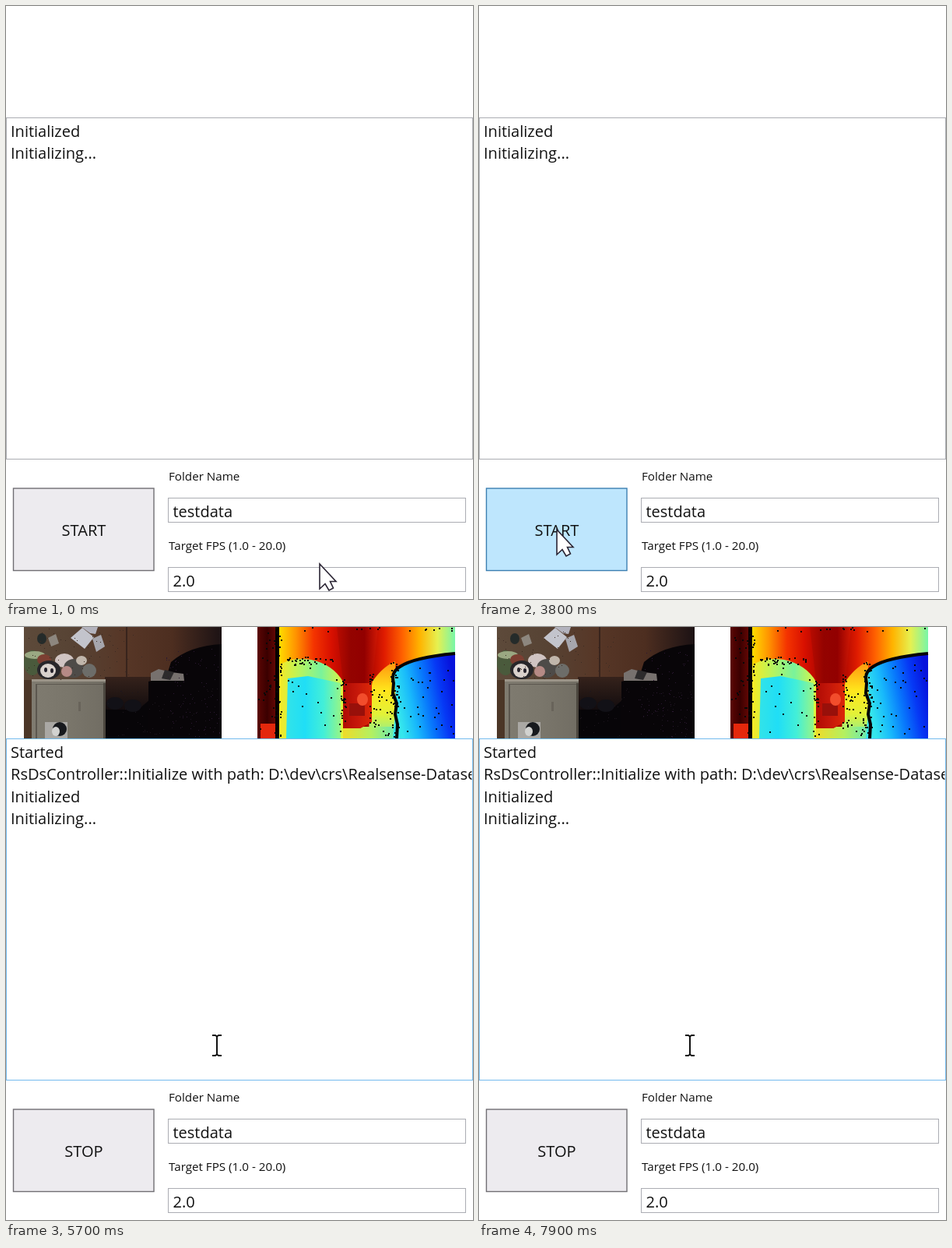
An HTML page with a canvas for the animation above (8 s loop, 600 by 761 pixels).

```html
<!DOCTYPE html>
<html lang="en">
<head>
<meta charset="utf-8">
<style>
html, body { margin: 0; width: 600px; height: 761px; overflow: hidden; background: #fff; }
canvas, svg.ui { position: absolute; left: 0; top: 0; }
text { font: 20.05px "Open Sans", "Noto Sans", sans-serif; fill: #111; white-space: pre; }
.small { font-size: 15.2px; }
.box { fill: #fff; stroke: #abadb3; }
#log { fill: none; }
#log.hover { stroke: #74bbee; }
#button { fill: #edebef; stroke: #706e73; stroke-width: 1.4; }
#button.hover { fill: #bee6fd; stroke: #3c7fb1; }
</style>
</head>
<body>
<canvas id="view" width="600" height="143"></canvas>
<svg class="ui" width="600" height="761">
  <rect x="0" y="143" width="600" height="618" fill="#fff"/>
  <svg width="598.5" height="761">
    <g id="added">
      <text x="6" y="167.5">Started</text>
      <text x="6" y="196">RsDsController::Initialize with path: D:\dev\crs\Realsense-Dataset</text>
    </g>
    <g id="first">
      <text x="6" y="167.5">Initialized</text>
      <text x="6" y="196">Initializing...</text>
    </g>
  </svg>
  <rect id="log" class="box" x=".5" y="143.5" width="599" height="438"/>
  <rect id="button" x="9.5" y="619" width="180.5" height="105.5"/>
  <text id="label" x="100" y="680" text-anchor="middle"></text>
  <text class="small" x="209" y="609">Folder Name</text>
  <rect class="box" x="208.5" y="631.5" width="382" height="31"/>
  <text x="214.5" y="656">testdata</text>
  <text class="small" x="209" y="698">Target FPS (1.0 - 20.0)</text>
  <rect class="box" x="208.5" y="720.5" width="382" height="31"/>
  <text x="214.5" y="745">2.0</text>
  <path id="arrow" d="M0 0V32L7 25.5L12 34L17.5 31L13.5 22.5H21Z" fill="#fff" stroke="#2a2433" stroke-width="1.6"/>
  <path id="beam" d="M-6 -13H-2L0 -11.5L2 -13H6M0 -11.5V11.5M-6 13H-2L0 11.5L2 13H6" fill="none" stroke="#111" stroke-width="2"/>
</svg>
<script>
const LOOP = 8000, STEP = 100, START = 4000, VIDEO = 4800;
const $ = id => document.getElementById(id);
const ctx = $('view').getContext('2d');

// Pointer stops: time, x, y
const stops = [
  [0, 403, 716], [300, 402, 700], [1000, 384, 530], [1200, 385, 517], [1800, 474, 496],
  [2800, 474, 496], [3500, 120, 650], [3800, 100, 672], [4000, 100, 672],
  [4400, 150, 612], [4700, 191, 560], [5300, 271, 537], [LOOP, 271, 537]
];

function pointer(t) {
  const i = stops.findIndex(s => s[0] > t);
  const [t0, x0, y0] = stops[i - 1], [t1, x1, y1] = stops[i];
  const k = (t - t0) / (t1 - t0);
  return [x0 + (x1 - x0) * k, y0 + (y1 - y0) * k];
}

function random(seed) {
  let s = seed * 7919 + 17;
  return () => (s = (s * 16807 + 11) % 2147483647) / 2147483647;
}

function blend(x0, y0, x1, y1, ...colors) {
  const g = ctx.createLinearGradient(x0, y0, x1, y1);
  colors.forEach((c, i) => g.addColorStop(i / (colors.length - 1), c));
  return g;
}

function rect(x, y, w, h, fill) {
  ctx.fillStyle = fill;
  ctx.fillRect(x, y, w, h);
}

function shape(d, fill) {
  ctx.fillStyle = fill;
  ctx.fill(new Path2D(d));
}

function blob(x, y, rx, ry, fill) {
  ctx.fillStyle = fill;
  ctx.beginPath();
  ctx.ellipse(x, y, rx, ry, 0, 0, 7);
  ctx.fill();
}

function specks(rnd, n, x, y, w, h, fill, size = 2) {
  for (let i = 0; i < n; i++)
    rect(Math.round(x + rnd() * w), Math.round(y + rnd() * h), size, size, fill);
}

function drawRoom(rnd) {
  rect(23, 0, 254, 143, blend(23, 0, 277, 0, '#5d4a3a', '#574334', '#573727', '#4d2e20', '#1c1214'));
  rect(154, 0, 2, 85, '#38241c');
  rect(127, 80, 150, 63, '#070508');
  shape('M127 64H186V92L170 106H128Z', blend(0, 64, 0, 106, '#35221b', '#120c0e'));
  shape('M183 70L206 64L212 45Q236 24 277 22V143H183Z', '#080508');
  blob(140, 98, 11, 8, '#121117');
  blob(163, 101, 11, 8, '#121117');
  shape('M186 59L196 54L212 58L228 60L229 69H186Z', '#77716e');
  shape('M204 55L216 58L211 68L200 66Z', '#2d2b2c');
  shape('M83 14L98 1L113 13L101 28Z', '#c3c4cc');
  shape('M97 0H118L115 9L108 8Z', '#b3b3bd');
  shape('M111 15L122 10L127 25L116 32Z', '#a6a6ad');
  shape('M54 14L64 9L68 21L58 25Z', '#8d877f');
  blob(46, 15, 6, 7, '#252b2a');
  // Plush toys
  blob(34, 46, 11, 16, '#4a5a3c');
  blob(37, 36, 13, 5, '#9aa882');
  blob(49, 42, 9, 7, '#7c3f32');
  blob(75, 43, 12, 9, '#d0c4c2');
  blob(55, 55, 15, 12, '#27262a');
  blob(54, 56, 10, 9, '#d9d1cc');
  blob(51, 55, 2, 3, '#24202a');
  blob(59, 56, 2, 3, '#24202a');
  blob(87, 53, 13, 12, '#4e4b48');
  blob(78, 57, 7, 7, '#b68a85');
  blob(97, 43, 7, 6, '#c0b6ab');
  blob(107, 56, 9, 9, '#6d6d69');
  // Cabinet
  rect(23, 68, 11, 75, '#4b3627');
  rect(33, 67, 95, 76, blend(33, 0, 128, 0, '#7f7b70', '#7a766b', '#716d63'));
  rect(33, 67, 95, 3, '#9b9488');
  rect(38, 73, 88, 1, '#5c574f');
  rect(38, 73, 2, 70, '#5c574f');
  rect(125, 72, 3, 71, '#4b463e');
  rect(93, 96, 3, 12, '#68635a');
  rect(50, 122, 29, 21, '#aaa8a4');
  blob(69, 131, 9, 9, '#17191d');
  blob(64, 134, 5, 6, '#d2d2d0');
  specks(rnd, 90, 205, 28, 71, 113, '#2b1832', 1);
  specks(rnd, 70, 130, 75, 145, 67, '#1c151d', 1);
  specks(rnd, 60, 24, 1, 150, 66, '#3b2b23', 1);
}

function drawDepth(rnd) {
  const still = random(5);
  rect(323, 0, 254, 143, blend(350, 0, 577, 0,
    '#ffe000', '#ff9200', '#f43400', '#d81000', '#a60400', '#a20200', '#e01c00', '#ff6000', '#ffb400', '#e6f050', '#78f6a8'));
  rect(323, 0, 25, 143, blend(323, 0, 348, 0, '#5c0604', '#3b0000', '#690805'));
  rect(327, 124, 19, 19, '#e4280c');
  // Left block
  shape('M350 50Q365 38 392 42Q420 48 433 70V143H347Z', blend(348, 0, 433, 0, '#ffe81c', '#b9f45c', '#79f39c', '#e0f53c'));
  shape('M362 66L388 63L430 72V143H360Z', blend(360, 0, 432, 0, '#32e3e8', '#20def6', '#43efd8', '#9cf680'));
  // Floor and central column
  shape('M468 74Q482 52 500 44V143H466Z', blend(0, 50, 0, 143, '#ffa010', '#ffe51c', '#e2f238', '#7eeea0'));
  shape('M433 128H505V143H433Z', blend(433, 0, 505, 0, '#efdb28', '#b4f060', '#5ce8c0'));
  shape('M425 0H478L470 75V122L455 130H433V70Z', blend(425, 0, 478, 0, '#b80b00', '#940300', '#920000', '#d01804'));
  shape('M433 72H470V122L455 130H433Z', blend(433, 0, 470, 0, '#b00b04', '#c6180a', '#dc2808'));
  rect(441, 98, 20, 16, '#98100a');
  blob(458, 93, 7, 8, '#f24d2c');
  // Far right block
  shape('M497 143L501 100L499 60Q510 42 577 34V143Z', blend(500, 90, 577, 75,
    '#35e6ed', '#18b9fb', '#0879fc', '#0639f5', '#0712dc'));
  ctx.strokeStyle = '#050505';
  ctx.lineWidth = 4;
  ctx.stroke(new Path2D('M577 34Q524 39 506 51Q494 58 498 72L497 85L502 98L500 112L503 125L502 143'));
  rect(346, 0, 5, 143, '#080000');

  for (const [src, share] of [[still, 1], [rnd, .5]]) {
    const dots = (n, x, y, w, h) => specks(src, n * share, x, y, w, h, '#080808');
    dots(28, 344, 0, 9, 140);
    dots(22, 360, 38, 60, 10);
    dots(10, 358, 50, 70, 88);
    dots(16, 428, 58, 8, 82);
    dots(14, 466, 55, 8, 82);
    dots(14, 472, 60, 28, 80);
    dots(26, 493, 45, 12, 96);
    dots(20, 506, 48, 69, 90);
    dots(10, 352, 0, 222, 5);
    dots(14, 324, 5, 20, 130);
  }
}

function draw(now) {
  const t = Math.floor(now % LOOP / STEP) * STEP;
  const [x, y] = pointer(t);
  const started = t >= START;
  const inLog = t >= 2800 && y > 143 && y < 582;
  const onButton = x > 9 && x < 190 && y > 619 && y < 725;

  $('added').style.display = started ? '' : 'none';
  $('first').setAttribute('transform', `translate(0 ${started ? 57 : 0})`);
  $('label').textContent = started ? 'STOP' : 'START';
  $('log').classList.toggle('hover', inLog);
  $('button').classList.toggle('hover', onButton);
  $('arrow').style.display = inLog ? 'none' : '';
  $('beam').style.display = inLog ? '' : 'none';
  for (const id of ['arrow', 'beam'])
    $(id).setAttribute('transform', `translate(${x} ${y})`);

  ctx.clearRect(0, 0, 600, 143);
  if (t >= VIDEO) {
    const rnd = random(t / STEP);
    drawRoom(rnd);
    drawDepth(rnd);
  }
}

function tick() {
  draw(performance.now());
  requestAnimationFrame(tick);
}
tick();
</script>
</body>
</html>
```
